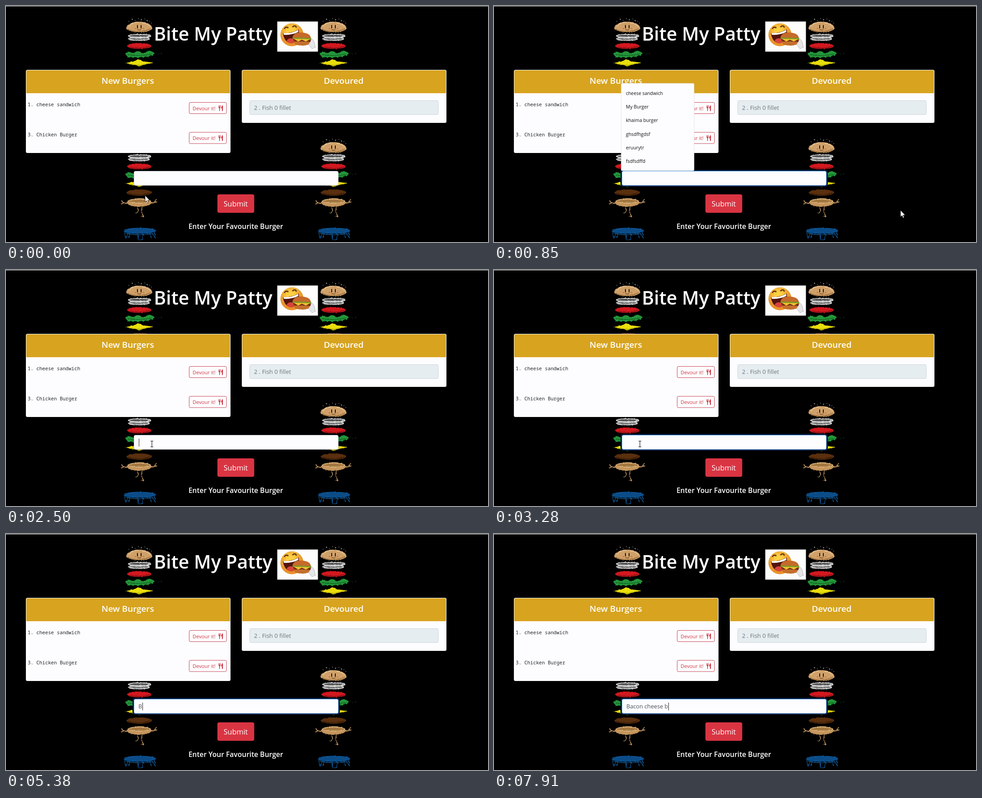
Write an HTML page that moves like this. It is 1067x525 px and loops after 8 s.

```html
<!DOCTYPE html>
<html lang="en">
<head>
<meta charset="utf-8">
<title>Burger list</title>
<style>
  html, body { margin: 0; width: 100%; height: 100%; overflow: hidden; background: #000; }
  svg { display: block; width: 1067px; height: 525px; }
  text { font-family: "Open Sans", "Noto Sans", sans-serif; white-space: pre; }
  .head { font-weight: 600; fill: #fff; text-anchor: middle; }
  .mono { font: 10.75px "Noto Sans Mono", "DejaVu Sans Mono", monospace; fill: #212529; }
  .field { font-size: 12.7px; fill: #495057; }
  #popup text { font-size: 10.4px; font-weight: 500; fill: #111; }
</style>
</head>
<body>
<svg viewBox="0 0 1067 525">
  <defs>
    <filter id="rough" x="-5%" y="-5%" width="110%" height="110%" color-interpolation-filters="sRGB">
      <feTurbulence type="fractalNoise" baseFrequency=".3" numOctaves="2" seed="4"/>
      <feDisplacementMap in="SourceGraphic" scale="3" xChannelSelector="R" yChannelSelector="G"/>
    </filter>
    <radialGradient id="skin" cx=".45" cy=".35">
      <stop offset=".3" stop-color="#fbd044"/><stop offset="1" stop-color="#e8922a"/>
    </radialGradient>

    <g id="stack" fill="none" stroke-linecap="round">
      <g filter="url(#rough)">
        <path d="M266 50C268 30 322 30 324 50C318 61 273 61 266 50Z" fill="#cfa16a"/>
        <path d="M270 52q25 10 50-1" stroke="#a87740" stroke-width="2"/>
        <path d="M272 45q8-9 20-9M302 37q12 2 17 9" stroke="#e6c08c" stroke-width="2"/>
        <g stroke="#d6d6d6" stroke-width="2">
          <ellipse cx="296" cy="66.500" rx="25" ry="3.500" fill="#555"/>
          <ellipse cx="294" cy="73" rx="23" ry="3.500" fill="#777"/>
          <path d="M271 67q22 8 49 0"/>
        </g>
        <ellipse cx="295" cy="89" rx="27" ry="6.500" fill="#d3181f"/>
        <path d="M274 91q20 6 44-1" stroke="#8e1015" stroke-width="2"/>
        <path d="M264 107q5-7 11-4t12-1 12 1 12-1 18 3l-5 6q-6-3-9 3-6-4-11 1-6-4-12 1-6-5-11 0-5-5-10-1Z" fill="#23963a"/>
        <path d="M270 108q25 5 53-1" stroke="#156c26" stroke-width="2"/>
        <path d="M264 127l20-4 9-5 10 5 23 3-18 4-13 4-13-4Z" fill="#e9de0c"/>
        <path d="M272 129l23 3 25-5" stroke="#aaa000"/>
        <ellipse cx="295" cy="147" rx="28" ry="7" fill="#5a300f"/>
        <path d="M271 149q24 7 48-1" stroke="#3c1d07" stroke-width="2"/>
        <ellipse cx="295" cy="169" rx="27" ry="9.500" fill="#c4955c"/>
        <ellipse cx="295" cy="166" rx="24" ry="4.500" fill="#a3773f" stroke="#e2bd86" stroke-width="1.300"/>
        <g stroke="#c99c65" stroke-width="1.600">
          <path d="M269 171l-9-1-4-5M260 170l-4 2M321 170l7-1 5-7M328 169l6-1"/>
          <path d="M291 179l2 8-4 6M301 179l-1 10 4 11-4 0M289 193l-2-1"/>
        </g>
        <g stroke="#0f62aa" stroke-width="1.200">
          <ellipse cx="296" cy="232" rx="35" ry="6" fill="#0b4c88"/>
          <path d="M262 235l3 14 5-10M274 238l-2 10M292 239l1 13 9 0 1-13M318 238l4 10M329 236l2 13-7-11"/>
          <path d="M264 237q32 8 65 0" stroke="#1c78c2"/>
        </g>
      </g>
      <path d="M291 43v6M299 43v6" stroke="#271607" stroke-width="2"/>
      <path d="M291 52q4 3 8 0" stroke="#3a200b"/>
      <path d="M285 50h2M303 50h2" stroke="#d06a4a" stroke-width="2"/>
      <path d="M272 34v0M279 29l1 1M286 32v0M293 28v0M299 31l1-1M307 29v0M312 32l1 1M318 34v0M322 38v0" stroke="#e5e0d8" stroke-width="1.300"/>
      <path d="M332 105v0M337 107v0M344 105v1" stroke="#175d24" stroke-width="1.400"/>
    </g>

    <g id="card-head">
      <path d="M45 194v-48q0-3 3-3h445q3 0 3 3v48Z" fill="#d8a41f"/>
    </g>
    <g id="devour">
      <rect x="405.500" y="214.500" width="82.500" height="25" rx="2.500" fill="#fdfdff" stroke="#c54450"/>
      <text x="413" y="231.500" font-size="11.2" fill="#d23a48">Devour it!</text>
      <path d="M470.500 221v4q0 2 1.500 2.500v6h1.500v-6q1.500-.5 1.500-2.500v-4h-1v4h-.8v-4h-1v4h-.8v-4ZM480 221q-3.500 1-3.500 7h1.500v5.500h2Z" fill="#cf2f3e"/>
    </g>
  </defs>

  <rect width="1067" height="525"/>
  <rect width="1067" height="1" fill="#b9bab2"/>
  <use href="#stack"/><use href="#stack" x="430"/>
  <use href="#stack" y="268"/><use href="#stack" x="430" y="268"/>

  <text class="head" x="458.500" y="76.500" font-size="41">Bite My Patty</text>

  <g>
    <rect x="600.500" y="34.500" width="90" height="67" fill="#fdfdfd"/>
    <circle cx="633" cy="64" r="25.500" fill="url(#skin)"/>
    <path d="M616 51q4-7 9-2M634 47q6-6 9 1" fill="none" stroke="#5b2b08" stroke-width="2.500"/>
    <path d="M613 60q17 2 35-8 3 18-6 28-16 7-24-5-4-6-5-15Z" fill="#55140c"/>
    <path d="M614 60q17 2 33-7l0 5q-15 7-32 6Z" fill="#fff"/>
    <path d="M621 78q5-9 14-5l5 8q-12 5-19-3Z" fill="#d8433a"/>
    <path d="M666 72q6-4 11 1 5 4 6 10l2 9-8 3-6-9q-7 1-9-4 2-4 4-10Z" fill="#e6e6e8" stroke="#b7b7bd"/>
    <path d="M634 70q3-12 21-11 18 1 20 12-20 4-41-1Z" fill="#c56a2a"/>
    <path d="M634 70l41 1 1 4-41-1Z" fill="#7d9a2b"/>
    <path d="M636 73l39 2-1 5-36-1Z" fill="#7a2a16"/>
    <path d="M637 73l36 1-9 5-9-4-8 4Z" fill="#f4c529"/>
    <path d="M637 79l36 1q-2 8-17 8-18 0-19-9Z" fill="#c56f2b"/>
  </g>

  <rect x="44" y="142" width="453" height="185" rx="3.500" fill="#fdfdff"/>
  <use href="#card-head"/>
  <text class="head" x="269.500" y="172.500" font-size="18.8">New Burgers</text>
  <text class="mono" x="48" y="223">1. cheese sandwich</text>
  <text class="mono" x="48" y="289.500">3. Chicken Burger</text>
  <use href="#devour"/><use href="#devour" y="66.500"/>

  <rect x="522" y="142" width="453" height="118" rx="3.500" fill="#fdfdff"/>
  <use href="#card-head" x="478"/>
  <text class="head" x="747.500" y="172.500" font-size="18.8">Devoured</text>
  <rect x="539.500" y="210.500" width="417.500" height="31" rx="3" fill="#e6edf0" stroke="#ced4da"/>
  <text x="549" y="231" font-size="13" fill="#6c757d">2 . Fish 0 fillet</text>

  <rect id="glow" x="280" y="364.500" width="459" height="37.500" rx="5.500" fill="#001f40"/>
  <rect id="input" x="283.500" y="367.500" width="452" height="31.500" rx="3" fill="#fdfdff"/>
  <text id="typed" class="field" x="293" y="388"></text>
  <rect id="caret" y="375" width="1" height="17.500" fill="#222"/>
  <rect x="468" y="419" width="81.500" height="41" rx="4" fill="#d93442"/>
  <text x="508.500" y="446" font-size="16.2" fill="#fff" text-anchor="middle">Submit</text>
  <text class="head" x="508.700" y="496" font-size="15.6">Enter Your Favourite Burger</text>

  <g id="popup">
    <rect x="281.500" y="172" width="161.500" height="194.500" rx="2.500" fill="#fdfdff" stroke="#d4d4da" stroke-width=".6"/>
  </g>
  <path id="arrow" d="M0-.5v14.500l3.300-3 2.400 5.500 2.200-1-2.300-5.300h4.400Z" fill="#fff" stroke="#222" stroke-width=".8"/>
  <path id="beam" d="M-3-6.500h2.300l.7.700.7-.7h2.300M0-6v12M-3 6.500h2.300l.7-.7.7.7h2.300" fill="none" stroke="#111" stroke-width="1.100"/>
</svg>
<script>
const $ = id => document.getElementById(id);
const LOOP = 8000, BLINK = 244;

["cheese sandwich", "My Burger", "khaima burger", "ghsdfhgdsf", "eruurytr", "fsdfsdffd"].forEach((word, i) => {
  const item = document.createElementNS("http://www.w3.org/2000/svg", "text");
  item.setAttribute("x", 292);
  item.setAttribute("y", 198 + i * 30.2);
  item.textContent = word;
  $("popup").append(item);
});

// [time, x, y]
const mousePath = [
  [50, 308, 422], [300, 349, 386], [440, 349, 386], [850, 900, 455],
  [1510, 900, 455], [1880, 925, 439], [2020, 925, 439], [2470, 323, 387], [LOOP, 323, 387]
];
// [time, field content]; each entry also restarts the caret
const edits = [
  [240, ""], [370, ""], [2494, ""], [2530, ""], [4268, "N"], [4870, ""],
  [5230, "B"], [5600, "Ba"], [5860, "Bac"], [5930, "Baco"], [6010, "Bacon"], [6210, "Bacon "],
  [6700, "Bacon c"], [6780, "Bacon ch"], [7100, "Bacon che"], [7230, "Bacon chee"],
  [7460, "Bacon chees"], [7600, "Bacon cheese"], [7740, "Bacon cheese "], [7880, "Bacon cheese b"]
];
const FOCUS = 240, POPUP = 370, BLUR = 2020, REFOCUS = 2494, HIDE_MOUSE = 4268;

const clamp = v => Math.min(1, Math.max(0, v));
const show = (id, on) => $(id).setAttribute("visibility", on ? "visible" : "hidden");

function mouseAt(t) {
  const i = mousePath.findIndex(p => p[0] > t);
  if (i < 1) return mousePath[0].slice(1);
  const [t0, x0, y0] = mousePath[i - 1], [t1, x1, y1] = mousePath[i];
  const k = (t - t0) / (t1 - t0), e = k * k * (3 - 2 * k);
  return [x0 + (x1 - x0) * e, y0 + (y1 - y0) * e];
}

function draw(t) {
  const [since, content] = edits.findLast(e => e[0] <= t) || [0, ""];
  const focused = t >= FOCUS && t < BLUR || t >= REFOCUS;
  const fade = t < BLUR ? clamp((t - FOCUS) / 75)
    : t < REFOCUS ? 1 - clamp((t - BLUR) / 75) : clamp((t - REFOCUS) / 75);

  $("glow").setAttribute("opacity", fade);
  $("input").setAttribute("stroke", fade > .5 ? "#80bdff" : "#ced4da");
  $("typed").textContent = content;
  $("caret").setAttribute("x", Math.round(293.5 + (content ? $("typed").getComputedTextLength() : 0)));
  show("caret", focused && Math.floor((t - since) / BLINK) % 2 === 0);
  show("popup", t >= POPUP && t < BLUR || t >= 4240 && t < 4340);

  const [x, y] = mouseAt(t);
  const inField = x > 283 && x < 736 && y > 367 && y < 399;
  for (const id of ["arrow", "beam"]) {
    $(id).setAttribute("transform", `translate(${x.toFixed(1)} ${y.toFixed(1)})`);
    show(id, t < HIDE_MOUSE && inField === (id === "beam"));
  }
}

const start = performance.now();
function frame() {
  draw((performance.now() - start) % LOOP);
  requestAnimationFrame(frame);
}
frame();
</script>
</body>
</html>
```
